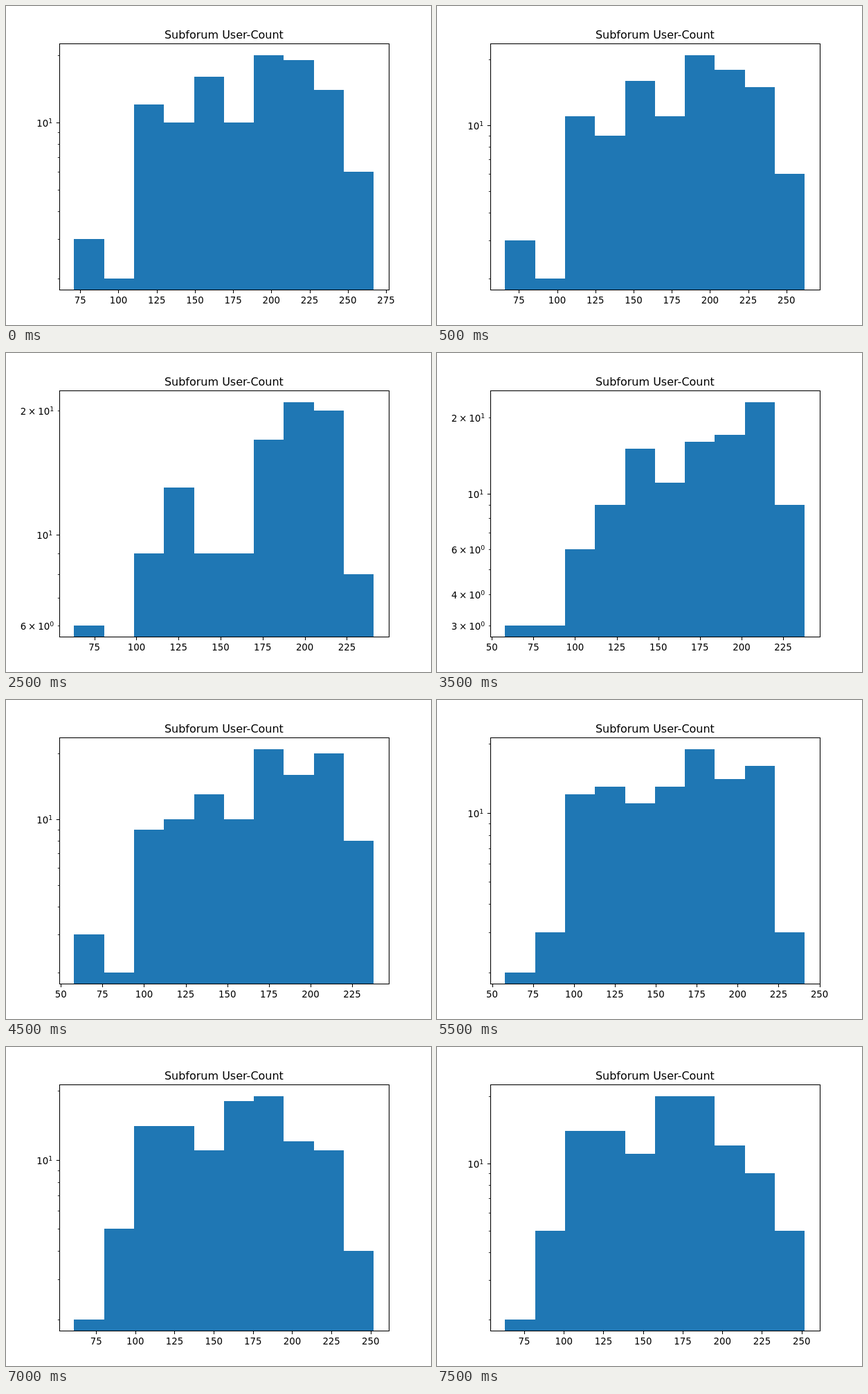
Animation, 614 px wide and 460 px high, one loop 8000 ms. Source, as an HTML page:

```html
<!DOCTYPE html>
<html lang="en">
<head>
<meta charset="utf-8">
<title>User-Count histogram</title>
<style>
  html, body { margin: 0; width: 100%; height: 100%; overflow: hidden; background: #fff; }
  svg { display: block; width: 614px; height: 460px; }
  text { font-family: "DejaVu Sans", Verdana, sans-serif; font-size: 13.333px; fill: #000; }
  .title { font-size: 16px; }
  .sup { font-size: 9.333px; }
  .axis { fill: none; stroke: #000; stroke-width: 1.067; }
  .minor { stroke-width: .8; }
  .bars { fill: #1f77b4; }
</style>
</head>
<body>
<svg viewBox="0 0 614 460">
  <g id="plot"></g>
  <rect class="axis" x="77.5" y="54.5" width="476" height="355"/>
  <text class="title" x="314.9" y="47" text-anchor="middle">Subforum User-Count</text>
</svg>
<script>
const STEP = 500;
const LEFT = 76.8, RIGHT = 552.96, TOP = 54.496, BOTTOM = 409.312;
const MARGIN = 0.05 / 1.1;
const X0 = LEFT + (RIGHT - LEFT) * MARGIN, X1 = RIGHT - (RIGHT - LEFT) * MARGIN;
const Y0 = BOTTOM - (BOTTOM - TOP) * MARGIN, Y1 = TOP + (BOTTOM - TOP) * MARGIN;

// full: every bin is given. between: only the extremes, bins blend from the neighbours.
const full = (lo, hi, ...counts) => ({ lo, hi, counts });
const between = (lo, hi, low, peak) => ({ lo, hi, low, peak });

const steps = [
  full(71, 267, 3, 2, 12, 10, 16, 10, 20, 19, 14, 6),
  between(66, 262, 2, 21),
  between(63, 258, 2, 20),
  full(60, 255, 3, 3, 9, 8, 17, 14, 19, 17, 16, 6),
  between(61, 244, 2, 21),
  full(63, 241, 6, 0, 9, 13, 9, 9, 17, 21, 20, 8),
  between(61, 241, 3, 22),
  full(58, 238, 3, 3, 6, 9, 15, 11, 16, 17, 23, 9),
  between(59, 238, 3, 20),
  full(58, 238, 3, 2, 9, 10, 13, 10, 21, 16, 20, 8),
  between(58, 244, 2, 20),
  between(58, 241, 2, 19),
  full(58, 257, 2, 4, 13, 15, 10, 15, 25, 13, 14, 1),
  between(59, 256, 2, 22),
  between(61, 252, 2, 19),
  full(63, 252, 2, 5, 14, 14, 11, 20, 20, 12, 9, 5)
];

function binsOf(index) {
  const { counts, low, peak } = steps[index];
  if (counts) return counts;
  let a = index, b = index;
  while (!steps[a].counts) a--;
  while (!steps[b].counts) b++;
  const k = (index - a) / (b - a);
  const mix = steps[a].counts.map((n, i) => n + (steps[b].counts[i] - n) * k);
  const bins = mix.map(n => Math.min(peak, Math.max(low, Math.round(n))));
  bins[mix.indexOf(Math.max(...mix))] = peak;
  bins[mix.indexOf(Math.min(...mix))] = low;
  return bins;
}

const snap = v => Math.floor(v + 0.5);
const inside = (v, a, b) => v >= a - 1e-6 && v <= b + 1e-6;
const line = (d, kind = "") => `<path class="axis ${kind}" d="${d}"/>`;

function barShapes(bins, yOf) {
  const edge = i => snap(X0 + (X1 - X0) * i / bins.length);
  const shapes = bins.map((n, i) =>
    n ? `M${edge(i)} 409V${snap(yOf(n))}H${edge(i + 1)}V409Z` : "");
  return `<path class="bars" d="${shapes.join("")}"/>`;
}

function xAxis(lo, hi) {
  let out = "";
  for (let v = 25; v <= 300; v += 25) {
    const x = X0 + (X1 - X0) * (v - lo) / (hi - lo);
    if (!inside(x, LEFT, RIGHT)) continue;
    out += line(`M${snap(x) + 0.5} 409.5v4.67`);
    out += `<text x="${x.toFixed(2)}" y="429" text-anchor="middle">${v}</text>`;
  }
  return out;
}

function powerLabel(y, x, power, factor) {
  const head = factor > 1 ? `${factor}<tspan dx="3">×</tspan><tspan dx="3">10</tspan>` : "10";
  return `<text x="${x}" y="${Math.round(y + 6)}" text-anchor="end">${head}` +
    `<tspan class="sup" dy="-5.1">${power}</tspan></text>`;
}

function yAxis(yOf, decades) {
  let out = "";
  for (let power = -1; power <= 1; power++) {
    for (let factor = 1; factor <= 9; factor++) {
      const y = yOf(factor * 10 ** power);
      if (!inside(y, TOP, BOTTOM)) continue;
      const major = factor === 1;
      out += line(`M77.5 ${snap(y) + 0.5}h${major ? -4.67 : -2.67}`, major ? "" : "minor");
      if (major) out += powerLabel(y, 67.1, power, 1);
      else if (decades <= 1 && [2, 3, 4, 6].includes(factor)) {
        out += powerLabel(y, 69.2, power, factor);
      }
    }
  }
  return out;
}

function render(index) {
  const { lo, hi } = steps[index];
  const bins = binsOf(index);
  const peak = Math.max(...bins), low = Math.min(...bins.filter(n => n > 0));
  const span = Math.log10(peak / low);
  const yOf = n => Y0 - (Y0 - Y1) * Math.log10(n / low) / span;
  return barShapes(bins, yOf) + xAxis(lo, hi) + yAxis(yOf, span * 1.1);
}

const plot = document.getElementById("plot");
const start = performance.now();
let shown = -1;

function update() {
  const index = Math.floor((performance.now() - start) / STEP) % steps.length;
  if (index !== shown) {
    plot.innerHTML = render(index);
    shown = index;
  }
  requestAnimationFrame(update);
}
update();
</script>
</body>
</html>
```
